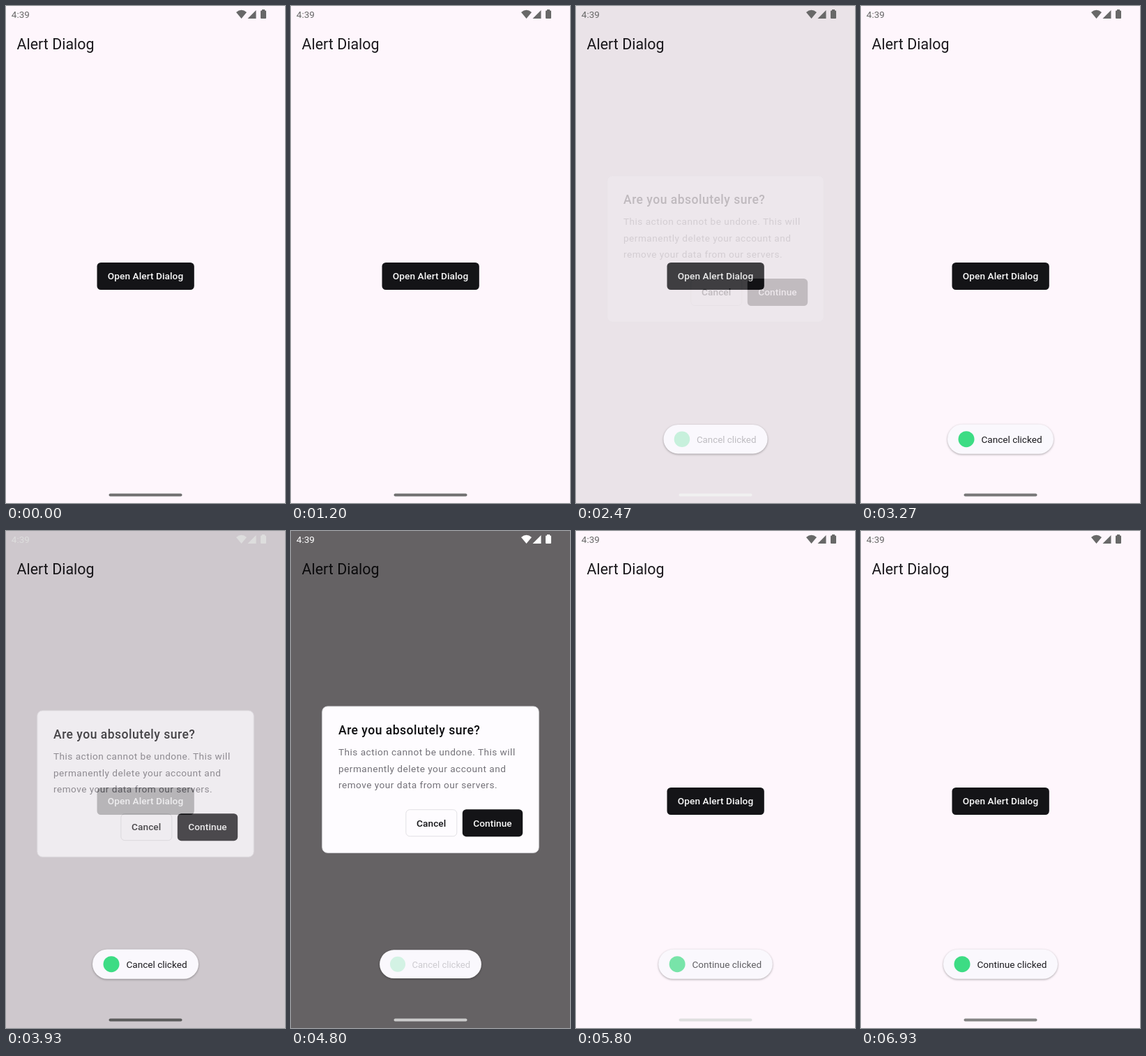
Recreate the animation shown at these times as an HTML page. Size 400 by 711 pixels, loop 7070 ms.

```html
<!DOCTYPE html>
<html lang="en">
<head>
<meta charset="utf-8">
<title>Alert Dialog</title>
<style>
  html, body { margin: 0; width: 100%; height: 100%; overflow: hidden; background: #fef6fc; }
  svg { display: block; width: 100vw; height: 100vh; font: 13.6px Roboto, sans-serif; }
  .title { font-size: 21.4px; fill: #1a181c; }
  .clock { font-size: 13.5px; }
  .label { font-weight: 500; letter-spacing: .1px; text-anchor: middle; }
  .ink { fill: #141417; }
  .paper { fill: #fefcff; }
  .outline { stroke: #e2e1e5; }
  .heading { font-size: 17.5px; font-weight: 500; letter-spacing: .486px; fill: #0c0c0f; }
  .body { letter-spacing: .486px; fill: #737178; }
  .toast { filter: drop-shadow(0 1px 1.5px rgba(0, 0, 0, .32)); }
</style>
</head>
<body>
<svg viewBox="0 0 400 711">
  <rect width="400" height="711" fill="#fef6fc"/>
  <text class="title" x="15.6" y="62">Alert Dialog</text>
  <rect class="ink" x="130.5" y="367" width="139.3" height="39" rx="5.5"/>
  <text class="label" x="200" y="391.3" fill="#fafafa">Open Alert Dialog</text>

  <rect id="dim" width="400" height="711"/>

  <g id="status">
    <text class="clock" x="7.8" y="17">4:39</text>
    <path d="M330 9Q337.5 2.5 345 9L337.5 18Z"/>
    <path d="M358.5 6V18H346.5Z"/>
    <path d="M367 5h4v1.5h1q1 0 1 1V17q0 1-1 1h-6q-1 0-1-1V7.500q0-1 1-1h1Z"/>
  </g>

  <g id="dialog">
    <rect class="paper outline" x="44.8" y="251" width="310.4" height="209.3" rx="7.5"/>
    <text class="heading" x="68" y="291.3">Are you absolutely sure?</text>
    <g class="body">
      <text x="68" y="321.300">This action cannot be undone. This will</text>
      <text x="68" y="344.700">permanently delete your account and</text>
      <text x="68" y="368">remove your data from our servers.</text>
    </g>
    <rect class="paper outline" x="164.800" y="398.700" width="73" height="38" rx="5.5"/>
    <text class="label ink" x="201.200" y="422.500">Cancel</text>
    <rect class="ink" x="245.800" y="398.200" width="86.400" height="39" rx="5.5"/>
    <text class="label" x="289" y="422.500" fill="#fafafa">Continue</text>
  </g>

  <rect id="handle" x="147.500" y="697.500" width="105" height="4" rx="2"/>

  <g id="toast" class="toast">
    <rect id="pill" y="598.500" height="42.300" rx="21.150" fill="#faf8fd"/>
    <g id="content">
      <circle id="icon" cy="619.700" r="11.500" fill="#3ddc84"/>
      <text id="message" y="624.800" fill="#1c1b1f"></text>
    </g>
  </g>
</svg>
<script>
  const LOOP = 7070, FPS = 15;
  const DIM = 0.6, FADE = 150;

  const dialogs = [{ open: 1235, close: 2336 }, { open: 3886, close: 5568 }];
  const toasts = [
    { show: 2342, hide: 4667, text: 'Cancel clicked', width: 152 },
    { show: 5556, hide: Infinity, text: 'Continue clicked', width: 164 }
  ];
  // Grey level of the navigation handle, which adapts late to its backdrop
  const handleTone = [
    [0, 112], [1235, 112], [1385, 45], [1480, 45], [1730, 200], [2070, 245],
    [2600, 240], [2930, 130], [3470, 112], [3886, 112], [4036, 45], [4136, 45],
    [4390, 195], [4800, 203], [5130, 250], [5730, 240], [6130, 140], [7070, 130]
  ];

  const $ = id => document.getElementById(id);
  const clamp = x => Math.min(1, Math.max(0, x));
  const mix = (a, b, p) => a + (b - a) * p;
  const set = (id, attrs) => {
    for (const name in attrs) $(id).setAttribute(name, attrs[name]);
  };

  // Cubic Bezier easing with control points (x1, 0) and (x2, 1)
  function ease(x, x1, x2) {
    let low = 0, high = 1;
    for (let i = 0; i < 24; i++) {
      const u = (low + high) / 2, v = 1 - u;
      if (3 * u * v * v * x1 + 3 * u * u * v * x2 + u ** 3 < x) low = u;
      else high = u;
    }
    return low * low * (3 - 2 * low);
  }

  function track(stops, t) {
    const next = stops.findIndex(stop => stop[0] > t);
    const [t0, a] = stops[next - 1], [t1, b] = stops[next];
    return mix(a, b, (t - t0) / (t1 - t0));
  }

  function dialogPose(t) {
    const current = dialogs.findLast(d => t >= d.open);
    if (!current) return { dim: 0, alpha: 0, shift: 0, light: 0 };
    const { open, close } = current;
    if (t < close) {
      const p = clamp((t - open) / FADE), rest = (1 - p) ** 3.2;
      return { dim: p, alpha: 1 - rest, shift: 20 * rest, light: clamp((t - open + 30) / 100) };
    }
    const p = clamp((t - close) / FADE), gone = p ** 1.5;
    return { dim: 1 - p, alpha: 1 - gone, shift: -10 * gone, light: 1 - clamp((t - close) / 100) };
  }

  function toastPose({ show, hide }, t) {
    if (t < hide) {
      const age = t - show;
      return {
        scale: mix(0.9, 1, ease(clamp(age / 333), 0, 0)),
        alpha: clamp(age / 66),
        content: clamp((age - 50) / 283)
      };
    }
    const age = t - hide;
    return {
      scale: mix(1, 0.9, ease(clamp(age / 250), 0.3, 1)),
      alpha: 1 - clamp((age - 150) / 100),
      content: 1 - clamp(age / 166)
    };
  }

  function drawToast(t) {
    const toast = toasts.findLast(item => t >= item.show);
    if (!toast) return set('toast', { opacity: 0 });
    const { scale, alpha, content } = toastPose(toast, t);
    const left = 200 - toast.width / 2;
    set('toast', {
      opacity: alpha,
      transform: `translate(200 619.7) scale(${scale}) translate(-200 -619.7)`
    });
    set('pill', { x: left, width: toast.width });
    set('icon', { cx: left + 27 });
    set('message', { x: left + 48.4 });
    set('content', { opacity: content });
    $('message').textContent = toast.text;
  }

  function draw(t) {
    const { dim, alpha, shift, light } = dialogPose(t);
    const grey = mix(104, 255, light), tone = track(handleTone, t);
    set('dim', { opacity: dim * DIM });
    set('dialog', { opacity: alpha, transform: `translate(0 ${shift})` });
    set('status', { fill: `rgb(${grey}, ${grey}, ${grey})` });
    set('handle', { fill: `rgb(${tone}, ${tone}, ${tone})` });
    drawToast(t);
  }

  function tick() {
    const t = performance.now() % LOOP;
    draw(Math.floor((t + 3.4) * FPS / 1000) * 1000 / FPS % LOOP);
    requestAnimationFrame(tick);
  }
  tick();
</script>
</body>
</html>
```
